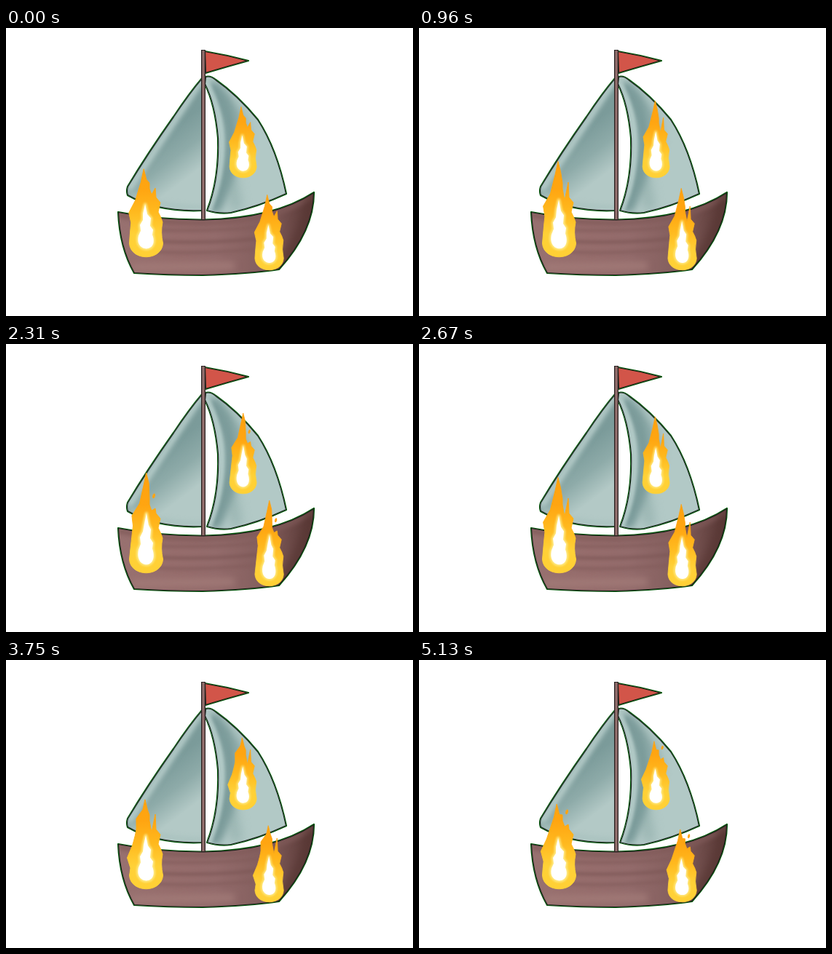
Animation of 559x396 px, one loop 5190 ms. Source, as an HTML page with a canvas:

```html
<!DOCTYPE html>
<html lang="en">
<head>
<meta charset="utf-8">
<title>Burning sailboat</title>
<style>
html, body { margin: 0; width: 100%; height: 100%; overflow: hidden; background: #fff; }
canvas { display: block; }
</style>
</head>
<body>
<canvas id="stage" width="559" height="396"></canvas>
<script>
const canvas = document.getElementById('stage');
const ctx = canvas.getContext('2d');
const LOOP = 5190, TICK = 30, STEP = 72, POSES = 6;

const hull = new Path2D('M154 253 Q210 264 272 263.500 Q368 262 423 226 Q423 279 375 332 Q335 338 270 340 Q222 340 176 337 Q156 302 154 253Z');
const leftSail = new Path2D('M270 68 Q252 89 230 122 Q194 173 167 218 Q165 224 167 230 C190 243 225 253 270 251Z');
const rightSail = new Path2D('M274 67 Q281 65 288 71 Q318 92 346 126 Q372 166 385 228 Q346 246 309 254 Q292 256 276 251 Q293 207 291 151 Q287 105 273 77Z');
const flag = new Path2D('M273 32 Q303 37 333 45 Q304 53 274 62Z');

function gradient(x0, y0, x1, y1, ...colors) {
  const g = ctx.createLinearGradient(x0, y0, x1, y1);
  colors.forEach((c, i) => g.addColorStop(i / (colors.length - 1), c));
  return g;
}

function stroke(path, color, width, blur = 0) {
  ctx.filter = blur ? `blur(${blur}px)` : 'none';
  ctx.strokeStyle = color;
  ctx.lineWidth = width;
  ctx.stroke(path);
  ctx.filter = 'none';
}

// Each shade is [path, colour, width, blur].
function paint(shape, fill, shades = []) {
  stroke(shape, '#005a08', 2.2);
  ctx.save();
  ctx.clip(shape);
  ctx.fillStyle = fill;
  ctx.fill(shape);
  shades.forEach(([d, ...style]) => stroke(new Path2D(d), ...style));
  stroke(shape, '#1b211c', 2.2);
  ctx.restore();
}

function drawBoat() {
  ctx.lineJoin = ctx.lineCap = 'round';
  paint(leftSail, gradient(200, 160, 240, 213, '#7b9b9a', '#8eaba9', '#b3c9c6'), [
    ['M268 72 L170 220', '#b4cbc8', 9, 3],
    ['M172 229 Q210 246 268 247', '#a8c1be', 5, 3]
  ]);
  paint(rightSail, '#b2c9c6', [
    ['M296 93 Q326 124 326 154', '#87a5a3', 14, 7],
    ['M306 190 Q312 218 316 244', '#9ab5b2', 15, 7],
    ['M286 84 Q309 118 309 155 Q309 200 287 244', '#7b9b9a', 20, 5],
    ['M276 77 Q294 110 296 151 Q298 205 279 250', '#b2cac7', 7, 2]
  ]);
  paint(hull, gradient(154, 0, 424, 0, '#987170', '#966d6c', '#936b6b', '#835e5d', '#573734'), [
    ['M156 257 Q210 269 272 268 Q360 267 420 232', '#805a59', 6, 3],
    ['M188 276 Q260 282 346 274', '#825c5b', 3, 2],
    ['M180 291 Q270 300 378 286', '#7b5655', 3, 2],
    ['M184 306 Q270 314 380 300', '#835d5c', 3, 2],
    ['M176 329 Q240 328 310 327', '#a27b78', 9, 5],
    ['M420 232 Q414 286 375 329', '#583734', 13, 7]
  ]);
  paint(flag, '#d25549');
  ctx.fillStyle = '#2a2322';
  ctx.fillRect(268, 30, 6, 234);
  ctx.fillStyle = '#94706e';
  ctx.fillRect(269.3, 31, 3.4, 232);
}

// Outermost left edge of a flame whose base sits at (193, 315).
const leftEdge = y => 166 + 26 * ((285 - y) / 95) ** 2;
const wave = (pose, shift) => Math.cos((pose + shift) * Math.PI * 2 / POSES);

function flameShape(pose) {
  const tipX = 191 + 2 * wave(pose, -2.5);
  const tipY = 188 + 10.5 * wave(pose, 0.9);

  // The right tongue rises twice per cycle and sheds a spark each time.
  const lick = pose % 3;
  const shed = lick === 2;
  const tongueY = shed ? 226 : 220 - 8 * lick;
  const valleyY = 229 + 8 * Math.sin(lick * Math.PI / 2);

  const shape = new Path2D();
  shape.moveTo(tipX, tipY);
  shape.lineTo(tipX + 3.5, tipY + 14);
  shape.lineTo(197, 213);
  shape.lineTo(197, 221);
  shape.lineTo(200, valleyY);
  shape.lineTo(205, tongueY);
  shape.lineTo(206, 233);
  shape.lineTo(212, 240);
  shape.lineTo(209, 253);
  shape.quadraticCurveTo(213, 260, 215, 267);
  shape.quadraticCurveTo(212, 281, 215.5, 296);
  shape.bezierCurveTo(214, 321, 171, 321, 169.5, 296);

  // Bumps climb the left side, one spacing per cycle.
  const rise = 9;
  const first = 281 - rise * ((pose + 3) % POSES);
  for (let y = first; y > tipY + 18; y -= rise * POSES) {
    if (y < 275) shape.quadraticCurveTo(leftEdge(y + 14) + 4, y + 22, leftEdge(y + 14) + 5, y + 14);
    shape.lineTo(leftEdge(y), y);
    shape.lineTo(leftEdge(y - 17) + 5, y - 17);
  }
  shape.lineTo(tipX - 4, tipY + 18);
  shape.closePath();

  if (shed) {
    shape.moveTo(204, 206);
    shape.ellipse(203, 209, 1.3, 3, 0.2, 0, Math.PI * 2);
  }
  return shape;
}

function coreShape(pose) {
  const tipY = 239 + 6 * wave(pose, 0.9);
  const y = part => tipY + (304 - tipY) * part;
  const sway = wave(pose, -2.5);
  const core = new Path2D();
  core.moveTo(192 + sway, tipY);
  core.lineTo(195 + sway, y(0.22));
  core.lineTo(199, y(0.31));
  core.lineTo(198, y(0.48));
  core.lineTo(202, y(0.57));
  core.lineTo(201, y(0.68));
  core.bezierCurveTo(211, y(1.09), 176, y(1.09), 182, y(0.7));
  core.lineTo(185, y(0.59));
  core.lineTo(184, y(0.46));
  core.lineTo(188, y(0.35));
  core.lineTo(189 + sway, y(0.2));
  core.closePath();
  return core;
}

function drawFlame(x, y, scale, pose) {
  const body = flameShape(pose);
  const core = coreShape(pose);
  ctx.save();
  ctx.translate(x, y);
  ctx.scale(scale, scale);
  ctx.translate(-193, -315);
  ctx.fillStyle = gradient(0, 190, 0, 315, '#ffa20f', '#ffa511', '#ffb91e', '#ffd137', '#ffd035');
  ctx.fill(body);
  stroke(body, ctx.fillStyle, 1);
  stroke(core, '#ffec8c', 4, 1.5);
  ctx.fillStyle = '#fff';
  ctx.fill(core);
  ctx.restore();
}

function drawScene(pose) {
  ctx.fillStyle = '#fff';
  ctx.fillRect(0, 0, canvas.width, canvas.height);
  drawBoat();
  drawFlame(193, 315, 1, pose);
  drawFlame(326, 206, 0.805, pose);
  drawFlame(362, 333, 0.855, pose);
}

const start = performance.now();
let shown = -1;

function frame() {
  const time = (performance.now() - start) % LOOP;
  const tick = Math.floor(time / TICK) * TICK;
  const pose = Math.floor(tick / STEP) % POSES;
  if (pose !== shown) drawScene(shown = pose);
  requestAnimationFrame(frame);
}
frame();
</script>
</body>
</html>
```
